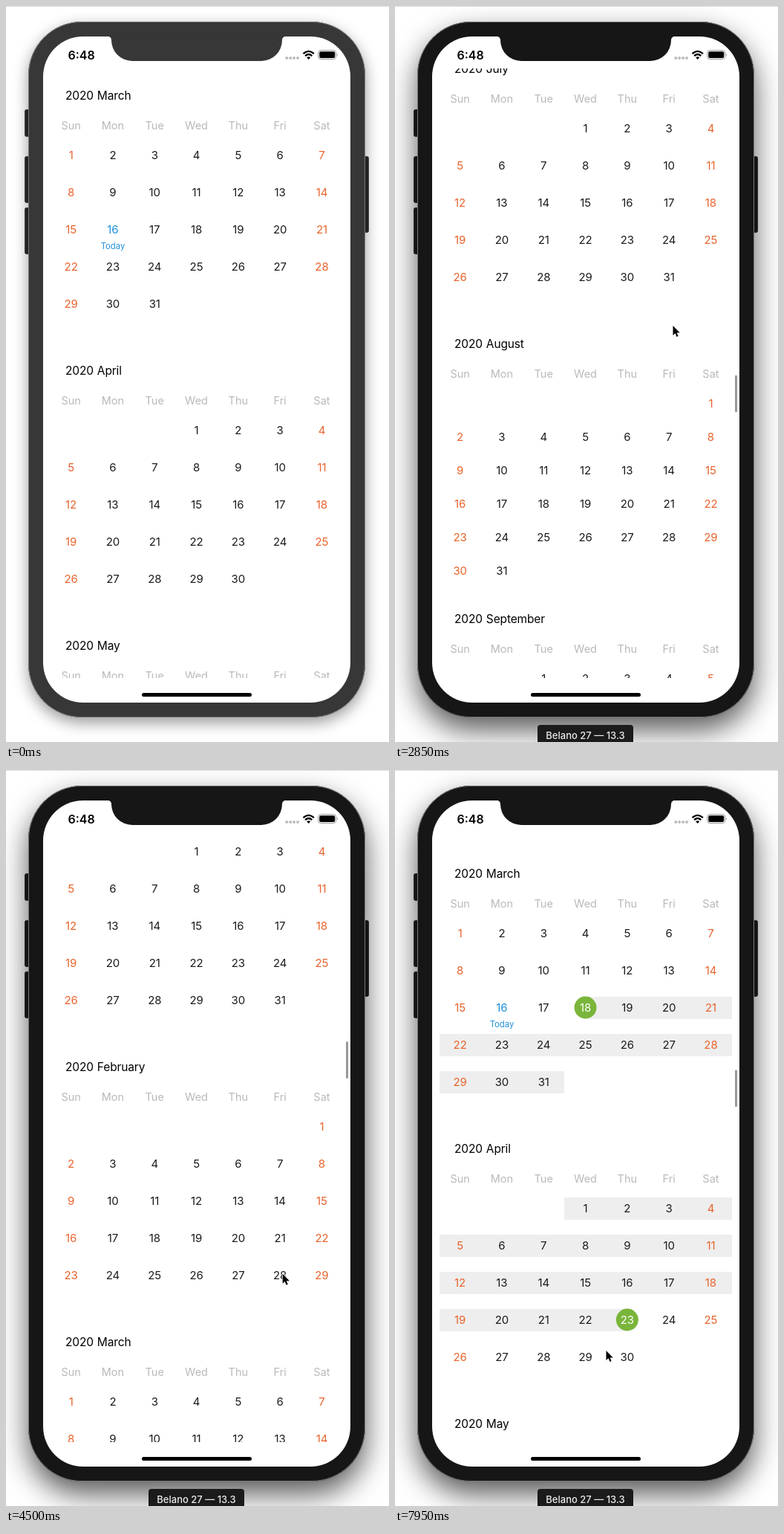
Animation, 516 px wide and 990 px high, one loop 8000 ms. Source, as an HTML page:

```html
<!DOCTYPE html>
<html lang="en">
<head>
<meta charset="utf-8">
<title>Calendar range picker</title>
<style>
html, body { margin: 0; width: 100%; height: 100%; overflow: hidden; background: #fff; }
svg { display: block; width: 516px; height: 990px; font-family: Inter, Roboto, sans-serif; }
.title { font-size: 15.5px; letter-spacing: -.15px; word-spacing: .8px; fill: #000; }
.name { font-size: 14.5px; fill: #b9b9b9; text-anchor: middle; }
.day { font-size: 15px; letter-spacing: -.1px; fill: #1c1c1c; text-anchor: middle; }
.weekend { fill: #e8632c; }
.today { fill: #1f8fd9; }
.note { font-size: 11.3px; text-anchor: middle; }
.picked { fill: #fff; }
#body { fill: #373737; filter: drop-shadow(0 7px 10px rgba(0,0,0,.4)); }
#notch { fill: #373737; }
#keys { fill: #2b2b2b; stroke: #4a4a4a; }
.active #body { fill: #161616; filter: drop-shadow(0 17px 19px rgba(0,0,0,.65)); }
.active #notch { fill: #161616; }
.active #keys { fill: #1d1d1d; stroke: #333; }
</style>
</head>
<body>
<svg id="stage" viewBox="0 0 516 990">
  <defs>
    <clipPath id="view"><rect x="50" y="84" width="414" height="820"/></clipPath>
  </defs>
  <rect width="516" height="990" fill="#fff"/>
  <rect width="516" height="1" fill="#dcdcdc"/>
  <g id="keys">
    <rect x="25.5" y="139.5" width="9" height="36" rx="2"/>
    <rect x="25.5" y="202.5" width="9" height="62" rx="2"/>
    <rect x="25.5" y="271.5" width="9" height="62" rx="2"/>
    <rect x="479.5" y="202.5" width="9" height="102" rx="2"/>
  </g>
  <rect id="body" x="30" y="21" width="454" height="936" rx="72"/>
  <rect x="30.5" y="21.5" width="453" height="935" rx="71.5" fill="none" stroke="#777"/>
  <rect x="50" y="41" width="414" height="896" rx="54" fill="#fff"/>
  <path id="notch" d="M136 40.5Q142 41 142 46A28 28 0 0 0 170 74H344A28 28 0 0 0 372 46Q372 41 378 40.5Z"/>
  <text x="83.5" y="71.5" font-size="16" font-weight="600">6:48</text>
  <path d="M378.3 70H393.2" stroke="#bcbcbc" stroke-width="4" stroke-linecap="round" stroke-dasharray="0 4.9"/>
  <g fill="none" stroke="#000" stroke-width="2.3">
    <path d="M400.5 64.2Q407.7 57.6 414.9 64.2"/>
    <path d="M403.1 67.1Q407.7 63 412.3 67.1"/>
  </g>
  <path d="M405.2 69.3Q407.7 67.2 410.2 69.3L407.7 72Z"/>
  <rect x="420.7" y="59.7" width="24" height="11.8" rx="3.3" fill="none" stroke="#999"/>
  <rect x="422.2" y="61.2" width="21" height="8.8" rx="2"/>
  <path d="M446 63.6Q447.8 65.6 446 67.6Z" fill="#999"/>
  <g clip-path="url(#view)"><g id="list"></g></g>
  <rect id="bar" x="458" width="3" height="50" rx="1.5" fill="#999"/>
  <rect x="183" y="924" width="148" height="5" rx="2.5"/>
  <g id="label">
    <rect x="192" y="967" width="129" height="30" rx="4" fill="#1b1b1b"/>
    <text x="256.5" y="986" font-size="13" font-weight="500" fill="#ececec" text-anchor="middle">Belano 27 — 13.3</text>
  </g>
  <path id="cursor" d="M.5 1V14L3.5 11.2L5.5 16L7.6 15.1L5.6 10.4H9.7Z" stroke="#fff" stroke-width="1.4" paint-order="stroke"/>
</svg>
<script>
const LOOP = 8000, STEP = 50;
const ENTER_AT = 50, ACTIVE_AT = 900, SCROLL_AT = 1000, START_AT = 6250, END_AT = 7100;
const MONTH_H = 370, LEFT = 59.5, COL = 56.3;
const TODAY = +new Date(2020, 2, 16), FIRST = +new Date(2020, 2, 18), LAST = +new Date(2020, 3, 23);
const NAMES = 'Sun Mon Tue Wed Thu Fri Sat'.split(' ');

// Flicks: [time, y of the March 2020 title]
const SCROLL = [[1000, 120], [1500, -1006], [2000, -2819.5], [2500, -3290],
  [2850, -1396], [3800, 672.5], [4300, 860], [5200, 139.5]];
// Turning points of the hand: [time, x, y]
const POINTER = [[50, 491, 196], [900, 306, 752], [1500, 307, 173], [1750, 311, 640],
  [2000, 310, 460], [2400, 350, 230], [2850, 374, 429], [3400, 365, 330], [3800, 344, 988],
  [4300, 370, 775], [5200, 376, 382], [6250, 255, 321], [6900, 311, 734], [7150, 311, 734],
  [7950, 284, 780]];

const $ = id => document.getElementById(id);
const show = (el, on) => el.setAttribute('visibility', on ? 'visible' : 'hidden');
const colX = c => LEFT + COL * (c + .5);
const bands = [], ends = [];

function add(parent, tag, attrs, text) {
  const el = document.createElementNS('http://www.w3.org/2000/svg', tag);
  for (const k in attrs) el.setAttribute(k, attrs[k]);
  if (text !== undefined) el.textContent = text;
  return parent.appendChild(el);
}

function addDay(g, date, col, y) {
  const x = colX(col), key = +date;
  const isEnd = key === FIRST || key === LAST;
  if (key >= FIRST && key <= LAST) {
    bands.push(add(g, 'rect', {
      x: key === FIRST ? x : x - COL / 2, y: y - 15,
      width: isEnd ? COL / 2 : COL, height: 30,
      fill: '#eee', 'shape-rendering': 'crispEdges'
    }));
  }
  const dot = isEnd && add(g, 'circle', { cx: x, cy: y, r: 15, fill: '#7ab53b' });
  const kind = key === TODAY ? 'today' : col % 6 ? '' : 'weekend';
  const text = add(g, 'text', { x, y: y + 5.5, class: `day ${kind}` }, date.getDate());
  if (isEnd) ends.push({ dot, text, at: key === FIRST ? START_AT : END_AT });
  if (key === TODAY) add(g, 'text', { x, y: y + 26.7, class: 'note today' }, 'Today');
}

function addMonth(offset) {
  const first = new Date(2020, 2 + offset, 1);
  const year = first.getFullYear(), month = first.getMonth(), lead = first.getDay();
  const count = new Date(year, month + 1, 0).getDate();
  const rowH = lead + count > 35 ? 45 : 50;
  const g = add($('list'), 'g', { transform: `translate(0 ${offset * MONTH_H})` });
  const name = first.toLocaleString('en-US', { month: 'long' });
  add(g, 'text', { x: 80, y: 5.7, class: 'title' }, `${year} ${name}`);
  NAMES.forEach((n, c) => add(g, 'text', { x: colX(c), y: 45.6, class: 'name' }, n));
  for (let d = 1; d <= count; d++) {
    const cell = lead + d - 1;
    addDay(g, new Date(year, month, d), cell % 7, 80 + Math.floor(cell / 7) * rowH);
  }
}
for (let m = -4; m <= 12; m++) addMonth(m);

// Smooth curve through the key points that never overshoots them
function sample(keys, t, k = 1) {
  const n = keys.length - 1;
  if (t <= keys[0][0]) return keys[0][k];
  if (t >= keys[n][0]) return keys[n][k];
  const i = keys.findIndex(key => key[0] > t) - 1;
  const slope = j => (keys[j + 1][k] - keys[j][k]) / (keys[j + 1][0] - keys[j][0]);
  const tangent = j => {
    if (j === 0 || j === n) return 0;
    const a = slope(j - 1), b = slope(j);
    return a * b <= 0 ? 0 : 2 * a * b / (a + b);
  };
  const h = keys[i + 1][0] - keys[i][0], u = (t - keys[i][0]) / h, v = 1 - u;
  return keys[i][k] * (1 + 2 * u) * v * v + keys[i + 1][k] * u * u * (3 - 2 * u)
    + h * u * v * (tangent(i) * v - tangent(i + 1) * u);
}

function render(t) {
  const top = sample(SCROLL, t);
  $('list').setAttribute('transform', `translate(0 ${top})`);
  $('bar').setAttribute('y', 411.7 - top * .0607);
  $('cursor').setAttribute('transform', `translate(${sample(POINTER, t)} ${sample(POINTER, t, 2)})`);
  $('stage').classList.toggle('active', t >= ACTIVE_AT);
  show($('label'), t >= ACTIVE_AT);
  show($('bar'), t >= SCROLL_AT);
  show($('cursor'), t >= ENTER_AT);
  for (const { dot, text, at } of ends) {
    show(dot, t >= at);
    text.classList.toggle('picked', t >= at);
  }
  bands.forEach(el => show(el, t >= END_AT));
}

const begin = performance.now();
function tick() {
  const t = (performance.now() - begin) % LOOP;
  render(Math.floor(t / STEP) * STEP);
  requestAnimationFrame(tick);
}
tick();
</script>
</body>
</html>
```
